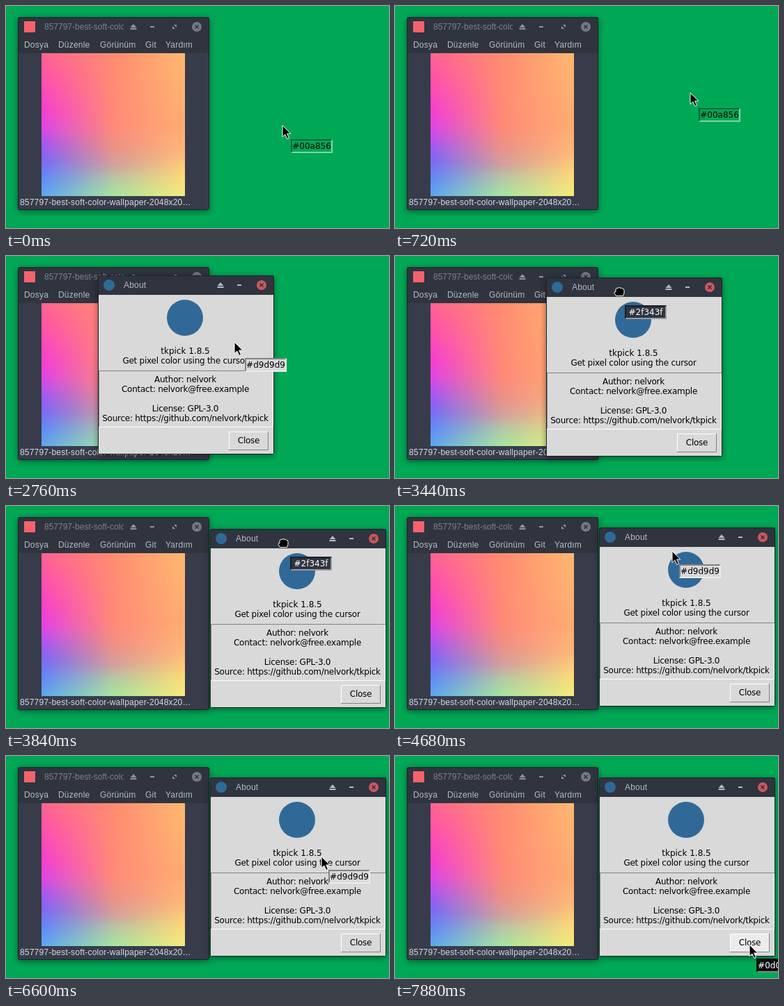
Animation, 550 px wide and 320 px high, one loop 8000 ms. Source, as an HTML page:

```html
<!DOCTYPE html>
<html lang="en">
<head>
<meta charset="utf-8">
<title>Colour picker</title>
<style>
  html, body { margin: 0; width: 100%; height: 100%; overflow: hidden; background: #00a856; }
  svg, #wallpaper { position: absolute; left: 0; top: 0; }
  .ui { font: 12px "Liberation Sans", Arial, sans-serif; letter-spacing: .2px; }
  .tk { font: 12px "DejaVu Sans", sans-serif; letter-spacing: -.25px; text-anchor: middle; }
  .wide { letter-spacing: 0; }
  .window { filter: drop-shadow(0 2px 5px rgba(0, 0, 0, .45)); }
  #wallpaper { left: 51px; top: 68px; width: 206px; height: 206px; }
  #wallpaper div { position: absolute; inset: 0; }
  .left { background: linear-gradient(#ff6490, #ff4fae 20%, #f53fd0 40%, #dd45e6 52%, #a058f4 65%, #7a68f8 75%, #6088f8 87%, #5ca8f0); }
  .middle {
    background: linear-gradient(#ff8c70, #ff8a78 50%, #ee9086 65%, #d2a09e 78%, #b4c8a4 88%, #a6e69e);
    mask-image: linear-gradient(90deg, transparent, #000 50%);
    -webkit-mask-image: linear-gradient(90deg, transparent, #000 50%);
  }
  .right {
    background: linear-gradient(#ffb870, #ffac72 50%, #ffb878 70%, #fcd878 85%, #f8ea7c);
    mask-image: linear-gradient(90deg, transparent 50%, #000);
    -webkit-mask-image: linear-gradient(90deg, transparent 50%, #000);
  }
</style>
</head>
<body>
<svg width="550" height="320">
  <defs>
    <path id="eject" d="M-4.500 1L0 -4L4.500 1ZM-4.500 2h9v2h-9Z"/>
    <path id="minimise" d="M-3 -1h6v2h-6Z"/>
    <path id="cross" d="M-2.500 -2.500L2.500 2.500M2.500 -2.500L-2.500 2.500" fill="none" stroke="#2f343f" stroke-width="1.600"/>
    <clipPath id="titleClip"><rect x="50" y="18" width="119" height="24"/></clipPath>
  </defs>
  <g class="window">
    <rect x="17" y="16" width="275" height="278" rx="3" fill="#1f232b"/>
    <path d="M18 68V20q0-3 3-3h267q3 0 3 3v48Z" fill="#2f343f"/>
    <rect x="18" y="68" width="273" height="225" fill="#383c4a"/>
  </g>
  <rect x="26" y="22" width="16" height="16" fill="#f4636b"/>
  <g class="ui" fill="#b5bbc6">
    <text x="55" y="34" fill="#7c818c" class="wide" clip-path="url(#titleClip)">857797-best-soft-color-wallpaper</text>
    <text x="26" y="60">Dosya</text>
    <text x="75" y="60">Düzenle</text>
    <text x="135" y="60">Görünüm</text>
    <text x="200" y="60">Git</text>
    <text x="229" y="60">Yardım</text>
    <text x="20" y="287" fill="#d3dae3">857797-best-soft-color-wallpaper-2048x20…</text>
  </g>
  <g fill="#90959f">
    <use href="#eject" x="183" y="30"/>
    <use href="#minimise" x="210" y="30"/>
    <path d="M241 27h4v4ZM239 29v4h4Z"/>
    <circle cx="274" cy="30" r="7" fill="#757983"/>
    <use href="#cross" x="274" y="30"/>
  </g>
</svg>

<div id="wallpaper"><div class="left"></div><div class="middle"></div><div class="right"></div></div>

<svg width="550" height="320">
  <g id="dialog">
    <g class="window">
      <rect width="253" height="258" rx="3" fill="#1f232b"/>
      <path d="M1 28V4q0-3 3-3h245q3 0 3 3v24Z" fill="#2f343f"/>
      <rect x="1" y="28" width="251" height="229" fill="#d9d9d9"/>
    </g>
    <circle cx="16" cy="14" r="8" fill="#306998"/>
    <text class="ui" x="37" y="18" fill="#b5bbc6">About</text>
    <g fill="#b5bbc6">
      <use href="#eject" x="176" y="14"/>
      <use href="#minimise" x="203" y="14"/>
      <circle cx="235" cy="14" r="7" fill="#cc575d"/>
      <use href="#cross" x="235" y="14"/>
    </g>
    <circle cx="125" cy="61" r="26" fill="#306998"/>
    <g fill="none">
      <path d="M1.500 219V137.500H252" stroke="#828282"/>
      <path d="M1 218.500H251.500V138" stroke="#fff"/>
    </g>
    <rect id="button" x="188" y="225" width="57" height="27"/>
    <path d="M188.500 252V225.500H245" fill="none" stroke="#fff"/>
    <path d="M188 251.500H244.500V225" fill="none" stroke="#828282"/>
    <g class="tk">
      <text class="wide" x="125.500" y="113">tkpick 1.8.5</text>
      <text x="125.500" y="127">Get pixel color using the cursor</text>
      <text x="125.500" y="154">Author: nelvork</text>
      <text x="125.500" y="168">Contact: nelvork@free.example</text>
      <text x="125.500" y="196">License: GPL-3.0</text>
      <text x="125.500" y="210">Source: https://github.com/nelvork/tkpick</text>
      <text x="216.500" y="242">Close</text>
    </g>
  </g>
  <g id="tip">
    <rect id="tipFill" width="60" height="20"/>
    <path id="tipDark" d="M0 20V0H60L58 2H2V18Z"/>
    <path id="tipLight" d="M0 20H60V0L58 2V18H2Z"/>
    <text id="tipText" class="tk wide" x="30" y="14"></text>
  </g>
  <path id="arrow" d="M0 0V16.500L3.800 13L6.800 19.500L9.500 18.300L6.600 12H11.800Z" stroke="#fff" stroke-linejoin="round"/>
  <path id="hand" d="M-4.500 6.500L-7 2.500Q-7.500 0 -5 .5V-3Q-4 -6 -2 -4.500Q0 -7 2 -4.500Q4 -6 5 -3.500Q7 -4 7 -1.500V2.500L5.500 6.500Z" stroke="#fff" stroke-linejoin="round"/>
</svg>

<script>
const LOOP = 8000, STEP = 40, TIP_LAG = 10;
const OPEN = 2200, GRAB = 3040, DROP = 4080, RELEASE = 4600;
const GRIP = [105, 20];

// Pointer path: time, x, y
const path = [
  [-10, 399, 172], [0, 397, 172], [160, 380, 187], [280, 374, 160], [420, 395, 112],
  [580, 440, 135], [700, 428, 128], [840, 397, 110], [1000, 383, 67],
  [1801, 383, 67], [1829, 440, 151], [1840, 442, 150], [2040, 384, 168],
  [2200, 384, 168], [2600, 375, 160], [2750, 333, 127], [2760, 328, 124],
  [2960, 237, 48], [3040, 237, 48], [3800, 398, 53], [3900, 398, 53],
  [4080, 398, 51], [4590, 398, 51], [4960, 400, 109], [5280, 422, 78],
  [5430, 422, 78], [5440, 422, 75], [5520, 421, 69], [5760, 401, 95],
  [5980, 423, 118], [6240, 408, 131], [6560, 453, 144], [6640, 453, 145],
  [7080, 440, 204], [7840, 509, 272], [LOOP, 509, 272]
];
const $ = id => document.getElementById(id);
const move = (id, [x, y]) => $(id).setAttribute("transform", `translate(${x} ${y})`);
const show = (id, on) => $(id).style.display = on ? "" : "none";
const within = (x, y, left, top, right, bottom) => x >= left && x < right && y >= top && y < bottom;

function pointerAt(t) {
  const i = Math.max(1, path.findIndex(key => key[0] >= t));
  const [t0, x0, y0] = path[i - 1], [t1, x1, y1] = path[i];
  const k = (t - t0) / (t1 - t0);
  return [Math.round(x0 + (x1 - x0) * k), Math.round(y0 + (y1 - y0) * k)];
}

function dialogAt(t) {
  const [x, y] = pointerAt(Math.min(Math.max(t, GRAB), DROP));
  return [x - GRIP[0], y - GRIP[1]];
}

const onButton = (x, y) => within(x, y, 188, 225, 245, 252);

function colourAt(x, y, open) {
  if (!open || !within(x, y, 0, 0, 253, 258)) return "#00a856";
  if (y < 28) return "#2f343f";
  if (Math.hypot(x - 125, y - 61) <= 26) return "#306998";
  if (within(x, y, 201, 233, 232, 243)) return "#0d0d0d";
  return onButton(x, y) ? "#ececec" : "#d9d9d9";
}

function render(t) {
  const open = t >= OPEN, grabbing = t >= GRAB && t < RELEASE;
  const pointer = pointerAt(t), dialog = dialogAt(t);
  const x = pointer[0] - dialog[0], y = pointer[1] - dialog[1];
  const colour = colourAt(x, y, open);

  show("dialog", open);
  move("dialog", dialog);
  $("button").style.fill = onButton(x, y) ? "#ececec" : "#d9d9d9";

  const [tipX, tipY] = pointerAt(t - TIP_LAG);
  move("tip", [tipX + 10, tipY + 20]);
  $("tipFill").style.fill = colour;
  $("tipDark").style.fill = `color-mix(in srgb, ${colour} 60%, black)`;
  $("tipLight").style.fill = `color-mix(in srgb, ${colour} 50%, white)`;
  $("tipText").textContent = colour;
  $("tipText").style.fill = /^#[0-2][0-9]?[d3]/.test(colour) || colour === "#2f343f" ? "#fff" : "#000";

  show("hand", grabbing);
  show("arrow", !grabbing);
  move("hand", pointer);
  move("arrow", pointer);
}

function tick() {
  render(Math.floor(performance.now() % LOOP / STEP) * STEP);
  requestAnimationFrame(tick);
}
tick();
</script>
</body>
</html>
```
